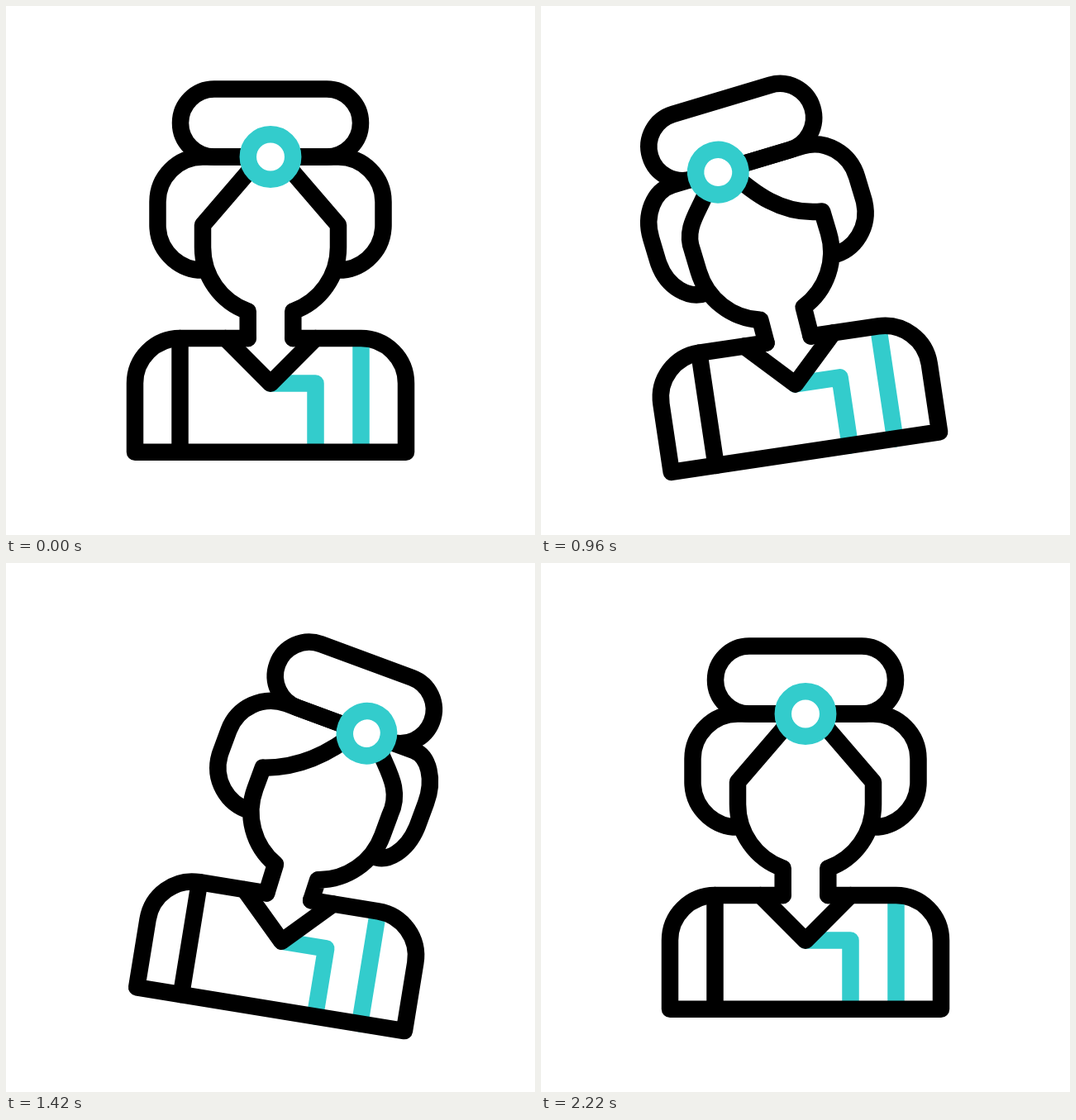
Animation of 640x640 px, one loop 2400 ms. Source, as an HTML page with a canvas:

```html
<!DOCTYPE html>
<html lang="en">
<head>
<meta charset="utf-8">
<title>Swaying figure</title>
<style>
  html, body { margin: 0; width: 100%; height: 100%; overflow: hidden; background: #fff; }
  canvas { display: block; width: 640px; height: 640px; }
</style>
</head>
<body>
<canvas id="stage" width="640" height="640"></canvas>
<script>
const ctx = document.getElementById('stage').getContext('2d');
const BLACK = '#000', TEAL = '#33cccc';
const LOOP = 2400, STEP = 20;
const KEYS = [0, 770, 1510, 2220];
const BODY_EASE = 2 / 3, HEAD_EASE = 0.77;
const NECK = 393, BASE = 540;
const rad = deg => deg * Math.PI / 180;

// cubic-bezier(h, 0, 1 - h, 1)
function ease(x, h) {
  let lo = 0, hi = 1;
  for (let i = 0; i < 24; i++) {
    const m = (lo + hi) / 2, n = 1 - m;
    if (3 * n * m * (n * h + m * (1 - h)) + m ** 3 < x) lo = m; else hi = m;
  }
  return lo * lo * (3 - 2 * lo);
}

// Weights of the left and right leaning poses; rest is both zero.
function poseAt(t, h) {
  const i = KEYS.findIndex((k, n) => t >= k && t < KEYS[n + 1]);
  if (i < 0) return [0, 0];
  const e = ease((t - KEYS[i]) / (KEYS[i + 1] - KEYS[i]), h);
  return [[e, 0], [1 - e, e], [0, 1 - e]][i];
}

function turn(deg, y) {
  ctx.translate(0, y);
  ctx.rotate(rad(deg));
  ctx.translate(0, -y);
}

function line(color, ...pts) {
  ctx.strokeStyle = color;
  ctx.beginPath();
  pts.forEach(p => ctx.lineTo(...p));
  ctx.stroke();
}

function drawBody() {
  line(TEAL, [0, 456.5], [54.5, 456.5], [54.5, 539.7]);
  line(TEAL, [109.5, 405], [109.5, 539.7]);
  line(BLACK, [-109.5, 402], [-109.5, 539.7]);
  line(BLACK, [-54.5, 402], [0, 456.7], [54.5, 402]);
  ctx.beginPath();
  ctx.moveTo(-27.3, 402);
  ctx.arcTo(-164, 402, -164, 460, 54.5);
  ctx.lineTo(-164, 539.7);
  ctx.lineTo(164, 539.7);
  ctx.arcTo(164, 402, 100, 402, 54.5);
  ctx.lineTo(27.3, 402);
  ctx.stroke();
}

// One half of hair and face; s mirrors it, x grows outward.
function drawSide(s, poseHead, inset, start, bend1, bend2) {
  const r = 54.5;
  ctx.save();
  ctx.beginPath();
  ctx.lineTo(27.3 * s, 402);

  poseHead();
  ctx.scale(s, 1);
  ctx.lineTo(27.3, 369.3);
  ctx.arc(0, 292, 82, Math.atan2(77.3, 27.3), 0, true);
  ctx.lineTo(82, 265);
  const dx = 82 - start, dy = 82.5, len = Math.hypot(dx, dy);
  const ctrl = (k, b) => [start + dx * k + dy / len * b, 182.5 + dy * k - dx / len * b];
  ctx.bezierCurveTo(...ctrl(2 / 3, bend2), ...ctrl(1 / 3, bend1), start, 182.5);

  const a = Math.PI / 2 + 0.07;
  ctx.moveTo(82 + (r - inset) * Math.cos(a), 265 + r * Math.sin(a));
  ctx.ellipse(82, 265, r - inset, r, 0, a, 0, true);
  ctx.ellipse(82, 237, r - inset, r, 0, 0, -Math.PI / 2, true);
  ctx.lineTo(0, 182.5);
  ctx.stroke();
  ctx.restore();
}

function draw(t) {
  const mixer = h => {
    const [l, r] = poseAt(t, h);
    return (a, b) => l * a + r * b;
  };
  const bodyMix = mixer(BODY_EASE), mix = mixer(HEAD_EASE);
  const jewel = mix(-27.7, 22), insetL = mix(11.5, 0), insetR = mix(1.3, 18.8);
  const dip = 18 * mix(1, 0) * mix(0, 1);
  const poseHead = () => {
    ctx.translate(0, mix(0, 1.2));
    turn(mix(-9.3, 11.2), NECK);
  };

  ctx.setTransform(1, 0, 0, 1, 0, 0);
  ctx.fillStyle = '#fff';
  ctx.fillRect(0, 0, 640, 640);
  ctx.lineWidth = 20.5;
  ctx.lineCap = ctx.lineJoin = 'round';

  ctx.translate(320, 0);
  turn(bodyMix(-9.9, 9.5), BASE);
  drawBody();
  drawSide(-1, poseHead, insetL, 11 - jewel, mix(-9, -14), mix(23, -17.5));
  drawSide(1, poseHead, insetR, 11 + jewel, mix(-14.5, 0), mix(-27, 24));

  poseHead();
  ctx.beginPath();
  ctx.roundRect(insetL - 109, 100.5, 218 - insetL - insetR, 82, 41);
  ctx.stroke();

  ctx.beginPath();
  ctx.ellipse(jewel, 182.5 + dip, 27.2 - mix(0, 0.7), 27.2, 0, 0, Math.PI * 2);
  ctx.fill();
  ctx.strokeStyle = TEAL;
  ctx.stroke();
}

function tick(now) {
  draw(Math.floor(now % LOOP / STEP) * STEP);
  requestAnimationFrame(tick);
}
draw(0);
requestAnimationFrame(tick);
</script>
</body>
</html>
```
